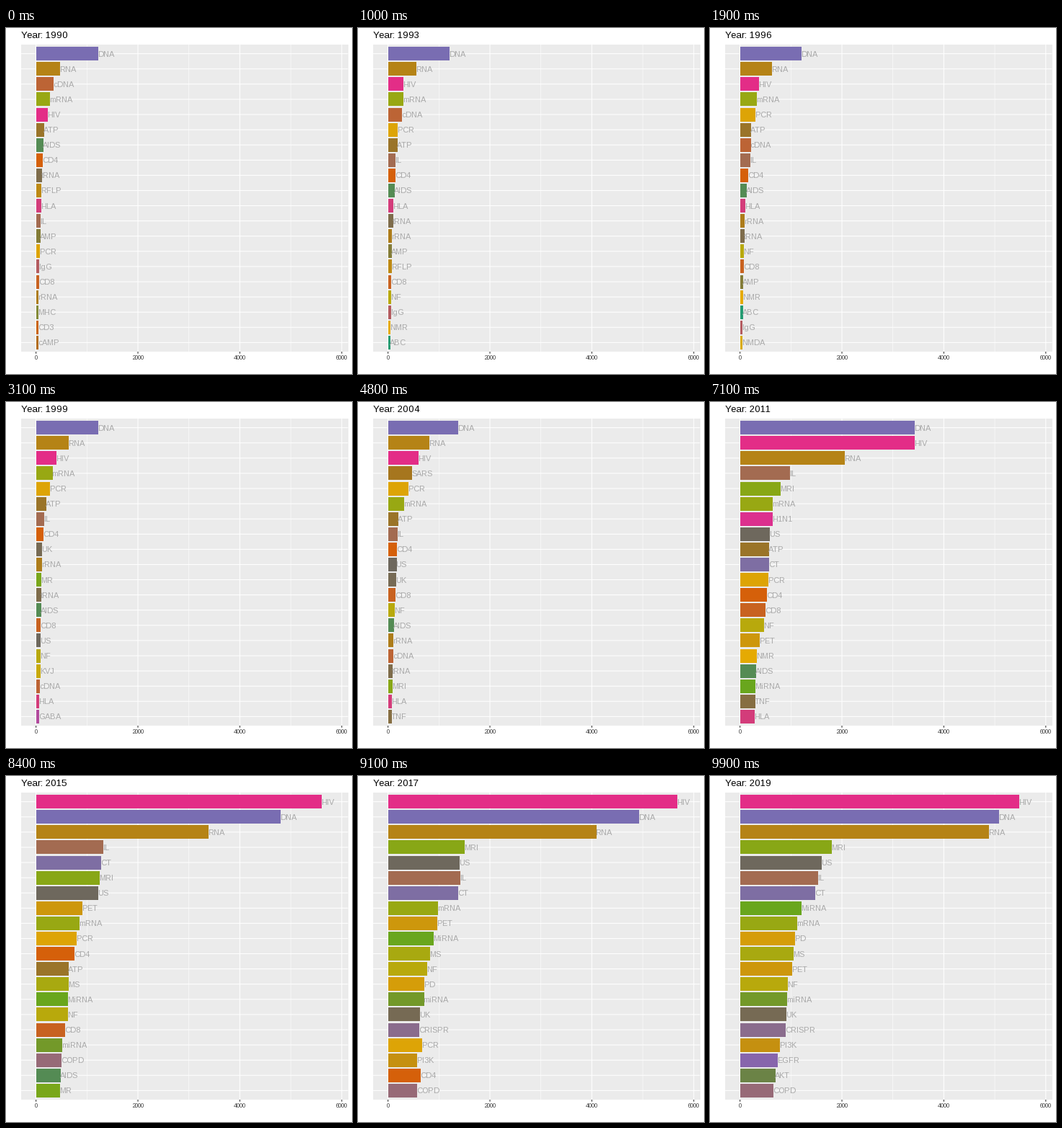
Write a matplotlib script that moves like this. It is 480 by 480 pixels and loops after 10 s.

```python
import numpy as np
import matplotlib.pyplot as plt
from matplotlib.animation import FuncAnimation
from matplotlib.colors import to_rgb
from matplotlib.patches import Rectangle

SIZE, FRAMES, ROWS = 480, 100, 20
LEFT, RIGHT, TOP, BOTTOM = 21, 474.5, 23, 449
X0 = LEFT + (RIGHT - LEFT) / 22
UNIT = 424.2 / 6000                      # pixels per count
STEP = (BOTTOM - TOP) / (ROWS + 0.2)     # row spacing

plt.rcParams.update({"font.family": "Liberation Sans", "text.hinting_factor": 1})

# Alphabetical slots along the colour ramp; "_" is an unused slot.
SLOTS = """ABC _ AIDS AKT AMP ATP cAMP CD3 CD4 CD8 cDNA _ _ COPD CRISPR CT
DNA EGFR _ _ GABA _ _ H1N1 HIV HLA _ IgG IL _ MHC miRNA
MiRNA MR MRI mRNA MS NF KVJ NMDA NMR PCR PD PET PI3K RFLP RNA rRNA
SARS _ _ _ TNF tRNA UK US _""".split()
DARK2 = ["#1B9E77", "#D95F02", "#7570B3", "#E7298A",
         "#66A61E", "#E6AB02", "#A6761D", "#666666"]

# frame -> (ranking, {rank: count}); counts between follow a power law
SNAPS = {
    0: ("DNA RNA cDNA mRNA HIV ATP AIDS CD4 tRNA RFLP "
        "HLA IL AMP PCR IgG CD8 rRNA MHC CD3 cAMP",
        {1: 1222, 2: 472, 5: 232, 6: 161, 13: 88, 15: 63, 20: 46}),
    19: ("DNA RNA HIV mRNA PCR ATP cDNA IL CD4 AIDS "
         "HLA rRNA tRNA NF CD8 AMP NMR ABC IgG NMDA",
         {1: 1208, 2: 628, 3: 373, 5: 303, 6: 219, 8: 204, 11: 105, 20: 49}),
    31: ("DNA RNA HIV mRNA PCR ATP IL CD4 UK rRNA "
         "MR tRNA AIDS CD8 US NF KVJ cDNA HLA GABA",
         {1: 1222, 2: 642, 3: 402, 5: 275, 6: 204, 9: 122, 17: 86, 20: 62}),
    48: ("DNA RNA HIV SARS PCR mRNA ATP IL CD4 US "
         "UK CD8 NF AIDS rRNA cDNA tRNA MRI HLA TNF",
         {1: 1378, 2: 812, 5: 402, 6: 317, 7: 204, 11: 160, 20: 76}),
    71: ("DNA HIV RNA IL MRI mRNA H1N1 US ATP CT "
         "PCR CD4 CD8 NF PET NMR AIDS MiRNA TNF HLA",
         {1: 3430, 2: 3425, 3: 2057, 4: 982, 5: 798, 6: 649, 7: 648,
          8: 586, 11: 557, 14: 471, 16: 331, 20: 289}),
    84: ("HIV DNA RNA IL CT MRI US PET mRNA PCR "
         "CD4 ATP MS MiRNA NF CD8 miRNA COPD AIDS MR",
         {1: 5609, 2: 4802, 3: 3387, 4: 1322, 7: 1222, 8: 911,
          11: 756, 12: 642, 15: 626, 17: 515, 20: 471}),
    99: ("HIV DNA RNA MRI US IL CT MiRNA mRNA PD "
         "MS PET NF miRNA UK CRISPR PI3K EGFR AKT COPD",
         {1: 5482, 2: 5085, 3: 4887, 4: 1803, 5: 1605, 7: 1477, 8: 1208,
          9: 1123, 12: 1025, 13: 940, 16: 895, 17: 784, 20: 655}),
}
# Sudden turns between snapshots
TURNS = {
    "HIV": {75: 4730, 79: 5268, 82: 5155, 85: 5832},
    "SARS": {41: 0},
    "H1N1": {61: 0},
}


def pace(f):
    """Even time, except a slow start and a surge before 2010."""
    return np.interp(f, [0, 48, 55, 66, 71, 99], [0, 48, 51.8, 69.4, 71, 99])


def year(f):
    return round(1990 + 29 * f / (FRAMES - 1))


def ramp(t):
    rgb = np.array([to_rgb(c) for c in DARK2])
    return [np.interp(t * 7, range(8), rgb[:, k]) for k in range(3)]


def expand(names, points):
    ranks = np.log(np.arange(1, ROWS + 1))
    logs = np.interp(ranks, np.log(list(points)), np.log(list(points.values())))
    return dict(zip(names.split(), np.exp(logs)))


def series(term):
    knots = dict(TURNS.get(term, {}))
    for f, row in rows.items():
        knots[f] = row.get(term, 0.8 * min(row.values()))
    at = sorted(knots)
    return np.interp(pace(np.arange(FRAMES)), pace(at), [knots[f] for f in at])


colors = {t: ramp((i + 0.4) / (len(SLOTS) - 0.6))
          for i, t in enumerate(SLOTS) if t != "_"}
rows = {f: expand(*snap) for f, snap in SNAPS.items()}
counts = {t: series(t) for t in colors}

# The order holds for a whole year, so rows swap abruptly.
marks = {year(f): f for f in range(FRAMES)}
marks.update({year(f): f for f in SNAPS})
order = {y: sorted(counts, key=lambda t: -counts[t][f])[:ROWS]
         for y, f in marks.items()}

fig = plt.figure(figsize=(SIZE / 72, SIZE / 72), dpi=72, facecolor="white")
ax = fig.add_axes([0, 0, 1, 1])
ax.set(xlim=(0, SIZE), ylim=(SIZE, 0))
ax.axis("off")


def line(xs, ys, width, color="white"):
    ax.plot(xs, ys, color=color, lw=width, solid_capstyle="butt",
            snap=False, zorder=2)


def row_y(i):
    return TOP + (i + 0.6) * STEP


ax.add_patch(Rectangle((LEFT, TOP), RIGHT - LEFT, BOTTOM - TOP,
                       fc="#EBEBEB", lw=0, zorder=1))
for v in range(1000, 6000, 2000):
    line([X0 + v * UNIT] * 2, [TOP, BOTTOM], 0.53)
for i in range(ROWS):
    line([LEFT, RIGHT], [row_y(i)] * 2, 1.07)
for v in range(0, 6001, 2000):
    x = X0 + v * UNIT
    line([x, x], [TOP, BOTTOM], 1.07)
    line([x, x], [BOTTOM, BOTTOM + 2.75], 1.07, "#333333")
    ax.text(x, 460, str(v), size=8.8, color="#4D4D4D", ha="center", va="baseline")

title = ax.text(LEFT, 14, "", size=13.2, color="black", va="baseline")
bars, labels = [], []
for i in range(ROWS):
    bars.append(ax.add_patch(Rectangle((X0, row_y(i) - 0.45 * STEP), 0,
                                       0.902 * STEP, lw=0, zorder=3)))
    labels.append(ax.text(X0, row_y(i) + 4, "", size=11.04, color="#A9A9A9",
                          va="baseline", zorder=4))


def draw(f):
    title.set_text(f"Year: {year(f)}")
    for term, bar, label in zip(order[year(f)], bars, labels):
        width = counts[term][f] * UNIT
        bar.set_width(width)
        bar.set_facecolor(colors[term])
        label.set_x(X0 + width - 1)
        label.set_text(term)
    return [title, *bars, *labels]


anim = FuncAnimation(fig, draw, frames=FRAMES, interval=100, repeat=True)
plt.show()
```
